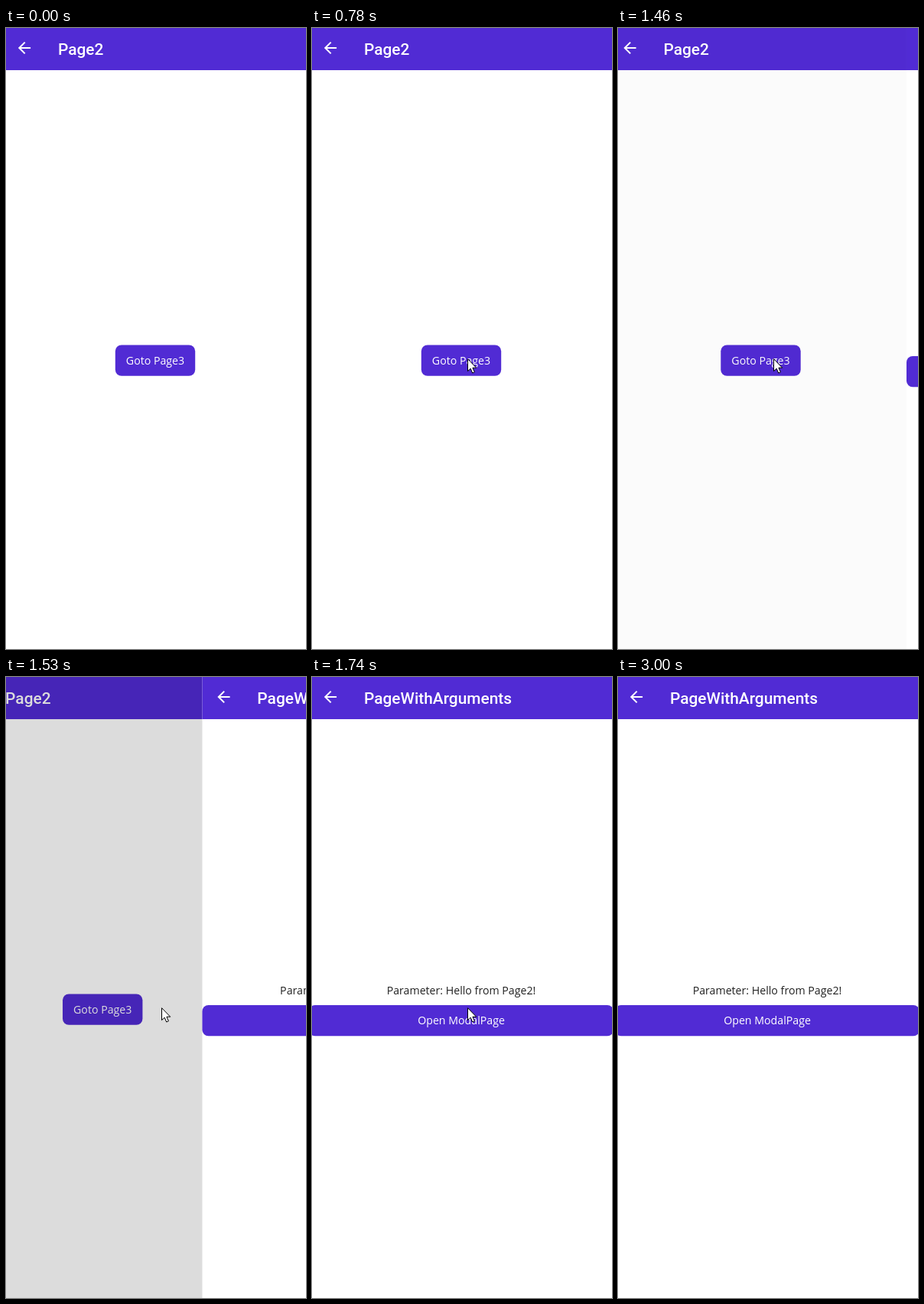
Write an HTML page with a canvas that moves like this. It is 392 px wide and 810 px high and loops after 3660 ms.

```html
<!DOCTYPE html>
<html lang="en">
<head>
<meta charset="utf-8">
<title>Page navigation</title>
<style>
html, body { margin: 0; width: 100%; height: 100%; overflow: hidden; background: #fff; }
canvas { display: block; width: 392px; height: 810px; }
</style>
</head>
<body>
<canvas id="stage"></canvas>
<script>
const W = 392, H = 810, LOOP = 3660, STEP = 70;
const PAGE_X = -4, PAGE_W = 398, MID = PAGE_X + PAGE_W / 2;
const DP = 1.0135;
const PURPLE = '#512bd4', INK = '#212121';
const BODY_FONT = `${14 * DP}px "Open Sans", sans-serif`;
const TITLE_FONT = '500 20.9px Roboto, sans-serif';
const REST = [203, 431];
const SLIDE = { start: 1425.3, length: 261.7 };

const arrowPath = new Path2D('M20 11H7.83l5.59-5.59L12 4l-8 8 8 8 1.41-1.41L7.83 13H20z');
const cursorPath = new Path2D('M.5.7V16.6L4.2 13.2 6.7 19 9.4 17.8 6.9 12.2H11.7Z');

const canvas = document.getElementById('stage');
const ctx = canvas.getContext('2d');
const ratio = window.devicePixelRatio || 1;
canvas.width = W * ratio;
canvas.height = H * ratio;

function text(str, x, y, font, color, align) {
  ctx.font = font;
  ctx.fillStyle = color;
  ctx.textAlign = align;
  ctx.fillText(str, x, y);
}

function button(label, x, y, w) {
  ctx.fillStyle = PURPLE;
  ctx.beginPath();
  ctx.roundRect(x, y, w, 40.3, 8 * DP);
  ctx.fill();
  text(label, MID, y + 25.3, BODY_FONT, '#fff', 'center');
}

function page(title, shift, drawBody) {
  ctx.save();
  ctx.translate(shift, 0);
  ctx.fillStyle = '#fff';
  ctx.fillRect(PAGE_X, 0, PAGE_W, H);
  ctx.fillStyle = PURPLE;
  ctx.fillRect(PAGE_X, 0, PAGE_W, 55);
  text(title, 67.9, 35, TITLE_FONT, '#fff', 'left');
  drawBody();
  ctx.translate(24 - 12 * DP, 26 - 12 * DP);
  ctx.scale(DP, DP);
  ctx.fillStyle = '#fff';
  ctx.fill(arrowPath);
  ctx.restore();
}

function firstBody() {
  button('Goto Page3', 142.8, 413.5, 104.4);
}

function secondBody() {
  text('Parameter: Hello from Page2!', MID, 413.5, BODY_FONT, INK, 'center');
  button('Open ModalPage', PAGE_X, 428, PAGE_W);
}

// Accelerate, then decelerate
function slideAt(t) {
  const held = 1390 + Math.floor((t - 1390) / STEP) * STEP;
  const u = Math.min(1, Math.max(0, (held - SLIDE.start) / SLIDE.length));
  return (1 - Math.cos(Math.PI * u)) / 2;
}

function cursorAt(t) {
  if (t < 220 || t >= 3000) return null;
  if (t >= 2930) return [239, 563];
  if (t >= 780) return REST;
  const u = 1 - Math.floor((t - 220) / STEP) / 7;
  return [Math.round(203 - 55 * u + 109 * u * u), Math.round(432 + 187 * u * u)];
}

function drawCursor([x, y]) {
  ctx.save();
  ctx.translate(x, y);
  ctx.fillStyle = '#fff';
  ctx.strokeStyle = '#000';
  ctx.lineWidth = 1;
  ctx.fill(cursorPath);
  ctx.stroke(cursorPath);
  ctx.restore();
}

function drawClick() {
  ctx.fillStyle = 'rgba(255, 255, 0, 0.47)';
  ctx.beginPath();
  ctx.arc(...REST, 12, 0, 2 * Math.PI);
  ctx.fill();
}

function draw(t) {
  ctx.setTransform(ratio, 0, 0, ratio, 0, 0);
  ctx.fillStyle = '#fff';
  ctx.fillRect(0, 0, W, H);

  const p = slideAt(t);
  if (p < 1) {
    page('Page2', -PAGE_W * p / 2, firstBody);
    ctx.fillStyle = `rgba(0, 0, 0, ${0.4 * p})`;
    ctx.fillRect(0, 0, W, H);
  }
  if (p > 0) page('PageWithArguments', PAGE_W * (1 - p), secondBody);

  const spot = cursorAt(t);
  if (spot) drawCursor(spot);
  if (t >= 1240 && t < 1390) drawClick();
}

const begin = performance.now();
function tick() {
  draw((performance.now() - begin) % LOOP);
  requestAnimationFrame(tick);
}
tick();
</script>
</body>
</html>
```
